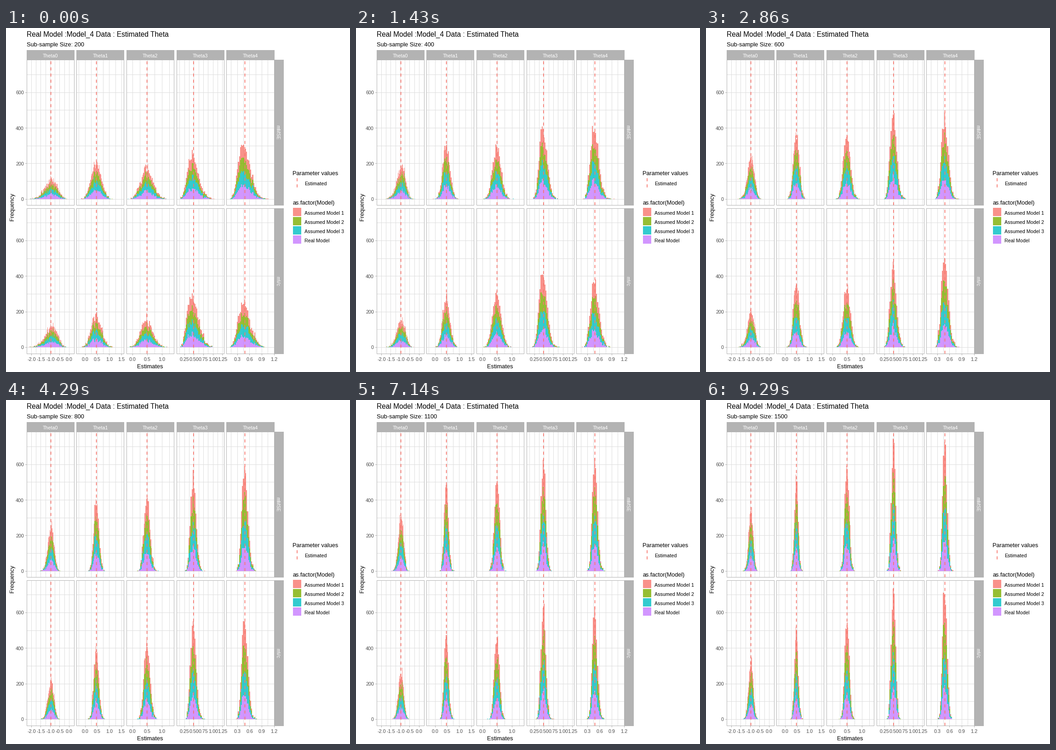
Write a matplotlib script that moves like this. It is 748x748 px and loops after 10000 ms.

```python
import numpy as np
import matplotlib.pyplot as plt
from matplotlib.animation import FuncAnimation
from matplotlib.collections import PolyCollection
from matplotlib.patches import Rectangle

W = H = 748
DPI = 100
PX = 72 / DPI
BIN = 0.025
SIZES = range(200, 1600, 100)
KNOTS = [200, 400, 600, 800, 1000, 1200, 1500]

GREY, GRID, DIM = "#B3B3B3", "#DEDEDE", "#4D4D4D"
RED = "#F8766D"
FILLS = [RED, "#7CAE00", "#00BFC4", "#C77CFF"]
MODELS = ["Assumed Model 1", "Assumed Model 2", "Assumed Model 3", "Real Model"]

# zero position, pixels per unit, tick step, decimals, dashed line, spread, skew
COLS = [
    (137.3, 40.9, 0.5, 1, 97.6, 0.335, -0.07),
    (172.0, 52.8, 0.5, 1, 196.6, 0.212, 0.02),
    (275.0, 64.0, 0.5, 1, 306.6, 0.208, 0.03),
    (367.3, 82.9, 0.25, 2, 407.8, 0.148, 0.09),
    (476.7, 88.6, 0.3, 1, 519.5, 0.149, 0.09),
]
# panel top, panel bottom, zero line, strip label
ROWS = [(69, 385, 372.2, "mMSE"), (392, 708, 694.3, "mVc")]
UNIT = 0.3865

# tallest stack of each panel at the knot sizes
PEAKS = [
    [(130, 198, 245, 279, 305, 325, 360),
     (212, 305, 376, 404, 459, 515, 545),
     (197, 308, 358, 413, 490, 527, 593),
     (278, 410, 485, 570, 612, 643, 745),
     (305, 411, 488, 591, 630, 646, 728)],
    [(137, 170, 213, 235, 302, 278, 350),
     (198, 303, 355, 413, 448, 500, 520),
     (196, 315, 352, 446, 451, 483, 543),
     (304, 410, 483, 553, 635, 663, 735),
     (270, 382, 502, 553, 625, 643, 712)],
]

# fixed draws: size, row, column, model, repetition
rng = np.random.default_rng(7)
DRAWS = rng.standard_normal((len(SIZES), 2, 5, 4, 1000))

plt.rcParams["font.family"] = "Liberation Sans"
fig = plt.figure(figsize=(W / DPI, H / DPI), dpi=DPI, facecolor="white")
ax = fig.add_axes([0, 0, 1, 1])
ax.set_xlim(0, W)
ax.set_ylim(H, 0)
ax.axis("off")


def left_of(i):
    return 45 + 108.7 * i


def right_of(i):
    return left_of(i) + 103.2


def mid(v):
    return int(v) + 0.5


def line(xs, ys, color, z=1):
    ax.plot(xs, ys, color=color, lw=PX, snap=False, zorder=z,
            solid_capstyle="butt", solid_joinstyle="miter")


def block(x0, y0, x1, y1, color, alpha=1):
    ax.add_patch(Rectangle((x0, y0), x1 - x0, y1 - y0, fc=color, lw=0,
                           alpha=alpha, antialiased=False))


def label(x, y, s, size, color="black", ha="left", turn=0):
    return ax.text(x, y, s, fontsize=size * PX, color=color, ha=ha,
                   va="baseline", rotation=turn, rotation_mode="anchor")


def dashes(x, bottom, top):
    ax.plot([x, x], [bottom, top], color=RED, lw=1.7 * PX, snap=False, zorder=5,
            dashes=(3.92, 3.92), dash_capstyle="butt")


def draw_panel(i, row):
    zero, scale, step, places, mark, _, _ = COLS[i]
    top, bottom, base, _ = row
    left, right = left_of(i), right_of(i)
    for k in range(8):
        y = mid(base - UNIT * 100 * k)
        line([left, right], [y, y], GRID)
    for k in range(-9, 13):
        x = zero + scale * step * k / 2
        if left + 1 < x < right - 1:
            line([mid(x)] * 2, [top, bottom], GRID)
        if top > 300 and k % 2 == 0 and left < x < right + 0.5:
            line([mid(x)] * 2, [bottom, bottom + 4], GREY)
            label(x, 724, f"{step * k / 2:.{places}f}", 10.7, DIM, "center")
    dashes(mark, bottom + 0.5, top)
    x0, x1, y0, y1 = mid(left), mid(right), top + 0.5, bottom + 0.5
    line([x0, x1, x1, x0, x0, x1], [y0, y0, y1, y1, y0, y0], GREY, 6)


def draw_static():
    label(45, 19, "Real Model :Model_4 Data : Estimated Theta", 15.5)
    for i in range(5):
        block(mid(left_of(i)) - 0.5, 48, mid(right_of(i)) + 0.5, 69, GREY)
        label(left_of(i) + 51.3, 63.5, f"Theta{i}", 10.6, "white", "center")
    for row in ROWS:
        top, bottom, base, name = row
        block(583, top, 604, bottom + 1, GREY)
        label(587.3, (top + bottom) / 2, name, 10.5, "white", "center", -90)
        for v in range(0, 800, 200):
            y = base - UNIT * v
            line([42, 45], [mid(y)] * 2, GREY)
            label(39, y + 4, str(v), 10.7, DIM, "right")
        for i in range(5):
            draw_panel(i, row)
    label(313.5, 740, "Estimates", 12.9, ha="center")
    label(17.5, 388.5, "Frequency", 12.7, ha="center", turn=90)

    label(623.5, 319.5, "Parameter values", 12.6)
    dashes(633, 346.6, 326.6)
    label(649, 341.5, "Estimated", 10.8)
    label(623.5, 383.5, "as.factor(Model)", 12.6)
    for k, (name, color) in enumerate(zip(MODELS, FILLS)):
        y = 391 + 20 * k
        block(624, y, 642, y + 18, color, 0.8)
        label(649, y + 14.5, name, 10.6)


def counts(i, r, frame):
    """Bin edges in pixels and the four stacked counts, bottom model first."""
    n = SIZES[frame]
    zero, scale, _, _, mark, spread, skew = COLS[i]
    lo = np.ceil((left_of(i) + 1 - zero) / scale / BIN)
    hi = np.floor((right_of(i) - 1 - zero) / scale / BIN)
    edges = (np.arange(lo, hi) + 0.5) * BIN
    shrink = np.sqrt(200 / n)
    z = DRAWS[frame, r, i]
    est = (mark - zero) / scale + spread * shrink * (z + skew * shrink * (z * z - 1))
    hist = np.array([np.histogram(e, edges)[0] for e in est], float)
    peak = np.interp(np.sqrt(n), np.sqrt(KNOTS), PEAKS[r][i])
    return zero + scale * edges, hist * peak / hist.sum(0).max()


def stack(i, r, frame):
    edges, hist = counts(i, r, frame)
    levels = np.vstack([np.zeros(hist.shape[1]), hist.cumsum(0)])
    ys = ROWS[r][2] - UNIT * np.repeat(levels, 2, axis=1)
    xs = np.repeat(edges, 2)[1:-1]
    outline = np.concatenate([xs, xs[::-1]])
    return [np.column_stack([outline, np.concatenate([ys[k + 1], ys[k][::-1]])])
            for k in range(4)]


draw_static()
subtitle = label(45, 40, "", 12.8)
bars = PolyCollection([], facecolors=FILLS[::-1] * 10, edgecolors="none",
                      alpha=0.8, antialiaseds=False, zorder=3)
ax.add_collection(bars, autolim=False)


def update(frame):
    subtitle.set_text(f"Sub-sample Size: {SIZES[frame]}")
    bars.set_verts([p for r in range(2) for i in range(5)
                    for p in stack(i, r, frame)])
    return bars, subtitle


anim = FuncAnimation(fig, update, frames=len(SIZES), interval=10000 / len(SIZES),
                     repeat=True, repeat_delay=0, blit=False)
plt.show()
```
